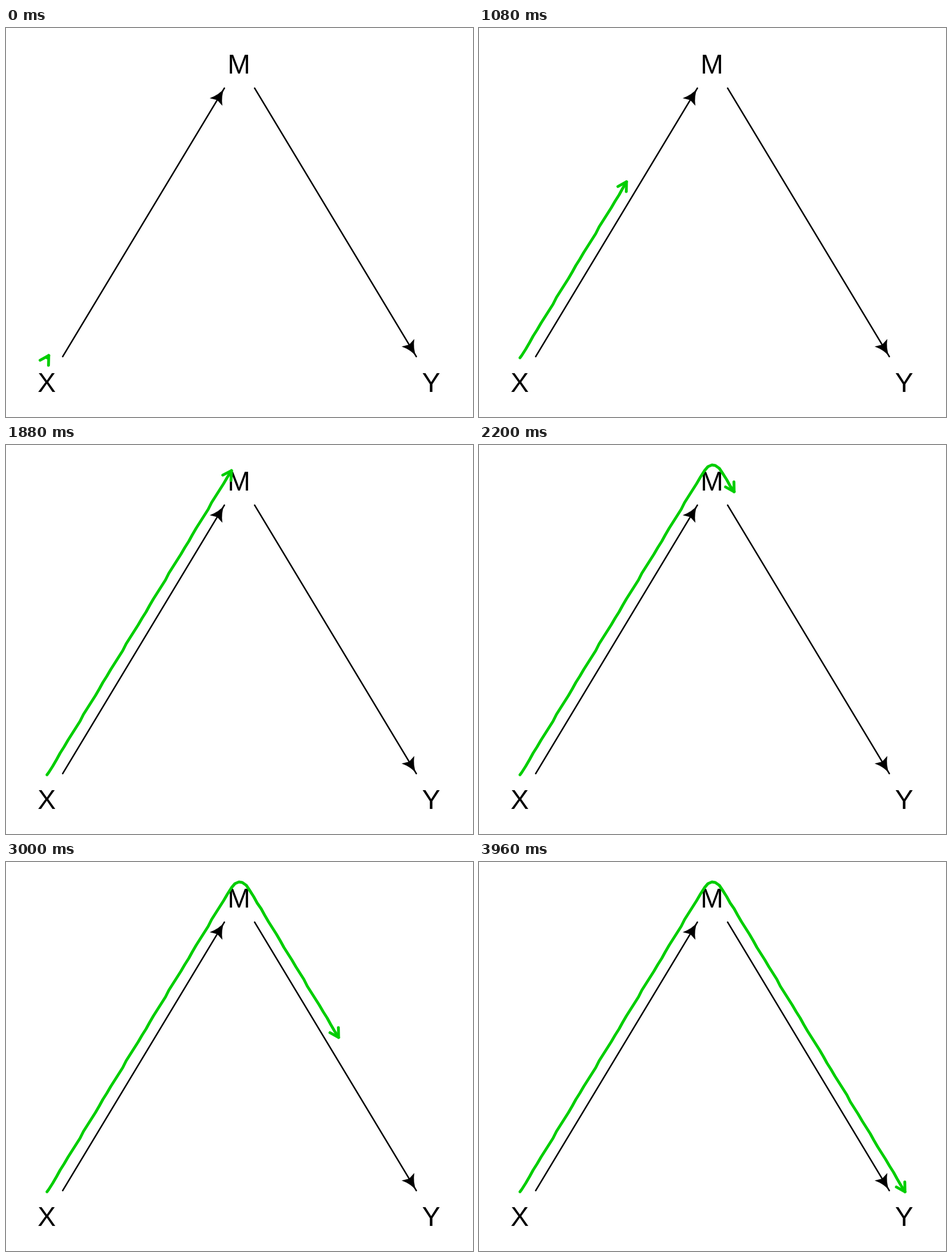
An HTML page with a canvas that plays this animation: 820 px wide and 683 px high, repeating every 4 s.

```html
<!DOCTYPE html>
<html>
<head>
<meta charset="utf-8">
<style>
  html, body { margin: 0; width: 100%; height: 100%; overflow: hidden; background: #fff; }
  canvas { display: block; }
</style>
</head>
<body>
<canvas id="stage" width="820" height="683"></canvas>
<script>
const ctx = document.getElementById('stage').getContext('2d');
const LOOP = 4000, STEP = 40, STEPS = LOOP / STEP;
const APEX_X = 410.3, PEAK_Y = 20.6, SLOPE = 1.653, ROUNDING = 17.4;

// Two straight flanks joined by a parabola at the top.
function curveY(x) {
  const d = Math.abs(x - APEX_X);
  return PEAK_Y + SLOPE * (d > ROUNDING ? d : (d * d / ROUNDING + ROUNDING) / 2);
}

function curveX(step) {
  if (step <= 47) return 75 + 6.82 * step;
  if (step >= 56) return 748 - 6.83 * (99 - step);
  return 395.5 + 6.53 * (step - 47);
}

// Whole-pixel points give the trail its slight waviness.
const trail = [[72, 579]];
for (let i = 0; i < STEPS; i++) {
  const x = curveX(i);
  trail.push([Math.round(x), Math.round(curveY(x))]);
}

function polyline(points) {
  ctx.beginPath();
  points.forEach(([x, y]) => ctx.lineTo(x, y));
  ctx.stroke();
}

function causalArrow(x1, y1, x2, y2) {
  ctx.strokeStyle = ctx.fillStyle = '#000';
  ctx.lineWidth = 2.5;
  polyline([[x1, y1], [x2, y2]]);
  ctx.save();
  ctx.translate(x2, y2);
  ctx.rotate(Math.atan2(y2 - y1, x2 - x1));
  ctx.beginPath();
  ctx.moveTo(0, 0);
  ctx.quadraticCurveTo(-15, -2, -28.5, -13);
  ctx.lineTo(-24.5, 0);
  ctx.lineTo(-28.5, 13);
  ctx.quadraticCurveTo(-15, 2, 0, 0);
  ctx.fill();
  ctx.restore();
}

function drawTrail(step) {
  const [x, y] = trail[step + 1];
  const tipX = curveX(step), backX = tipX - 3;
  const heading = Math.atan2(curveY(tipX) - curveY(backX), 3);
  const barb = turn => [
    x - 17.3 * Math.cos(heading + turn),
    y - 17.3 * Math.sin(heading + turn)
  ];
  ctx.strokeStyle = '#00cd00';
  ctx.lineWidth = 5;
  ctx.lineCap = ctx.lineJoin = 'round';
  polyline(trail.slice(0, step + 2));
  polyline([barb(Math.PI / 6), [x, y], barb(-Math.PI / 6)]);
}

function draw(time) {
  ctx.fillStyle = '#fff';
  ctx.fillRect(0, 0, 820, 683);
  causalArrow(99.5, 577, 383.5, 105.5);
  causalArrow(436.5, 105.5, 720.5, 577);
  ctx.font = '48px "Liberation Sans", Arial, sans-serif';
  ctx.textAlign = 'center';
  ctx.fillText('X', 71.5, 639);
  ctx.fillText('M', 409, 80);
  ctx.fillText('Y', 746.5, 639);
  drawTrail(Math.floor((time % LOOP) / STEP));
}

const start = performance.now();
function tick() {
  draw(performance.now() - start);
  requestAnimationFrame(tick);
}
tick();
</script>
</body>
</html>
```
